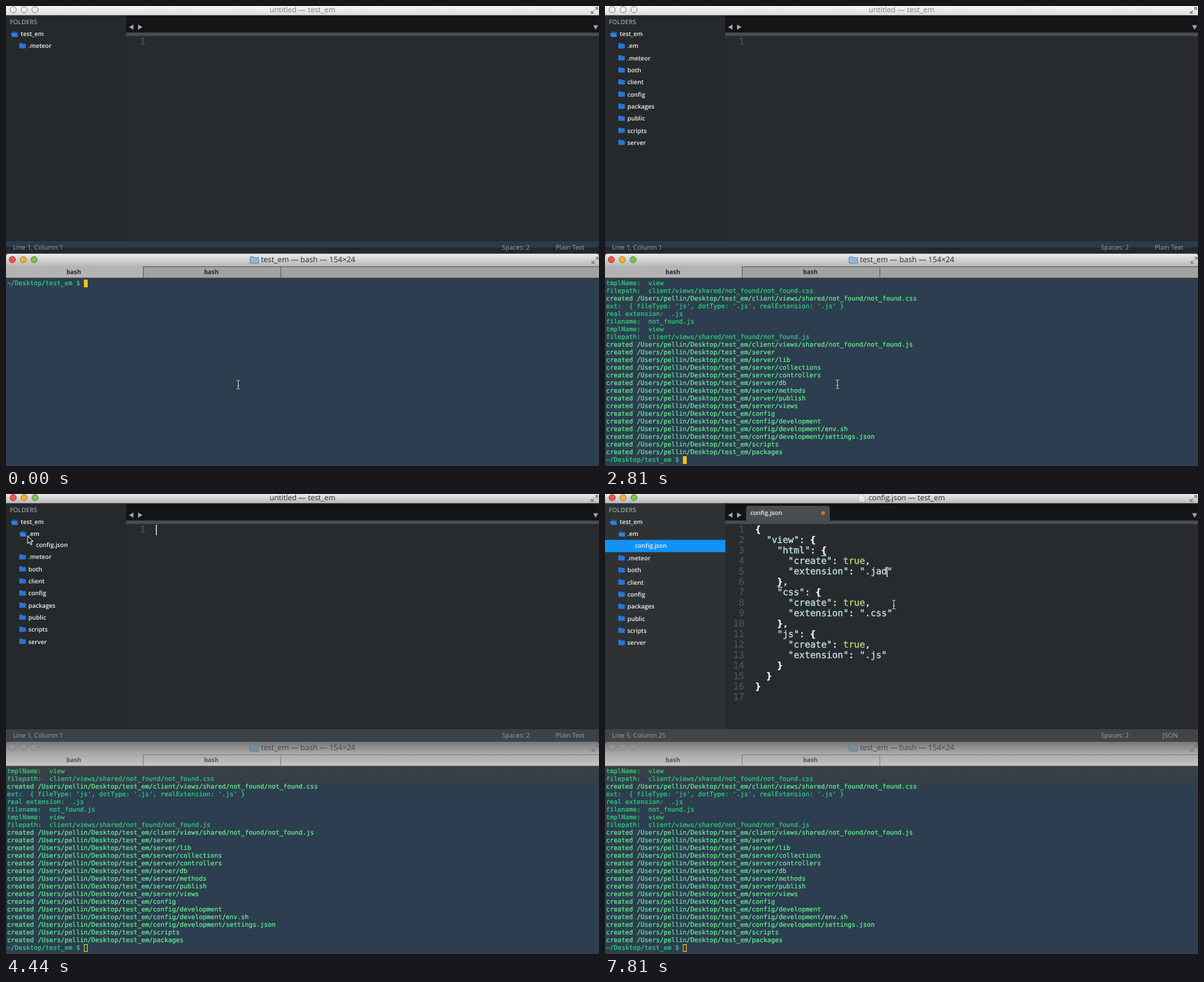
Write an HTML page that moves like this. It is 849 by 659 pixels and loops after 8000 ms.

```html
<!DOCTYPE html>
<html lang="en">
<head>
<meta charset="utf-8">
<title>Project scaffold</title>
<style>
html, body { margin: 0; width: 100%; height: 100%; overflow: hidden; background: #2c3e50; }
svg { display: block; width: 849px; height: 659px; }
text { white-space: pre; font-family: "Open Sans", "Noto Sans", sans-serif; text-rendering: geometricPrecision; }
.title { font-size: 10.7px; text-anchor: middle; }
.side { font-size: 8.7px; font-weight: 600; fill: #f2f4f5; }
.status { font-size: 9.25px; fill: #9da2a5; }
.tab { font-size: 8.9px; font-weight: 700; text-anchor: middle; fill: #262626; }
.code, .log { fill: currentColor; stroke: currentColor; stroke-width: .3px; }
.code { font: 13.05px "DejaVu Sans Mono", monospace; color: #f4f7f8; }
.num { color: #4b5356; text-anchor: end; }
.str { color: #c3e7ee; }
.kw { color: #b2dd7c; }
.br { color: #fff; font-weight: 700; }
.log { font: 9.136px "DejaVu Sans Mono", monospace; color: #31d478; stroke-width: .2px; }
.log.made { color: #66f48e; }
</style>
</head>
<body>
<svg viewBox="0 0 849 659" xmlns="http://www.w3.org/2000/svg">
  <defs>
    <linearGradient id="barOff" x2="0" y2="1"><stop stop-color="#f6f6f6"/><stop offset="1" stop-color="#dcdcdc"/></linearGradient>
    <linearGradient id="barOn" x2="0" y2="1"><stop stop-color="#ececec"/><stop offset="1" stop-color="#b6b6b6"/></linearGradient>
    <linearGradient id="barShade" x2="0" y2="1"><stop stop-color="#777"/><stop offset="1" stop-color="#adadad"/></linearGradient>
    <linearGradient id="tabShade" x2="0" y2="1"><stop stop-color="#a9a9a9"/><stop offset="1" stop-color="#c6c6c6"/></linearGradient>
    <linearGradient id="shadow" x2="0" y2="1"><stop stop-color="#3a4046"/><stop offset=".55" stop-color="#343f49"/><stop offset="1" stop-color="#2c3e50"/></linearGradient>
    <path id="closed" d="M0 1.2Q0 .4.8.4H3.4L4.4 1.4H8.6Q9.4 1.4 9.4 2.2V7.2Q9.4 8 8.6 8H.8Q0 8 0 7.2Z" fill="#2c73d2"/>
    <g id="open">
      <path d="M2 1.2Q2 .4 2.8.4H5.4L6.4 1.5H10.2V8H2Z" fill="#1f5cb0"/>
      <path d="M0 3H8.2L10 8.2H1.6Z" fill="#3580e0"/>
    </g>
    <path id="full" d="M5 1H9V5M9 1L5.5 4.5M0 6V9.5H4M0 9.5L3.6 6" fill="none" stroke="#777" stroke-width="1.1"/>
  </defs>

  <!-- editor window -->
  <rect width="849" height="354" fill="#272b2d"/>
  <rect id="edBar" width="849" height="13.5"/>
  <g id="edLights"></g>
  <g id="doc"><path d="M363.5 .5H369L372 3.5V11.5H363.5Z" fill="#fff" stroke="#8d8d8d" stroke-width=".8"/><path d="M369 .5V3.5H372" fill="none" stroke="#8d8d8d" stroke-width=".8"/></g>
  <text id="edTitle" class="title" y="9"/>
  <use href="#full" x="838" y="1"/>
  <rect id="sidebar" y="13.5" width="172" height="323.5"/>
  <rect x="172" y="13.5" width="677" height="24.5" fill="#121416"/>
  <rect x="172" y="38" width="677" height="5" fill="#4a4d50"/>
  <path d="M182.5 26.5V34L176 30.250ZM189 26.5V34L195.5 30.250ZM840.5 27.5H848L844.250 34Z" fill="#a0a3a5"/>
  <g id="tab">
    <path d="M202 39V20Q202 17 205 17H319Q322 17 322 20V39Z" fill="#4a4d50"/>
    <text class="side" x="208" y="30">config.json</text>
    <g id="cross"><rect x="308.5" y="23.5" width="7.5" height="7.5" rx="1.5" fill="#9b9ea0"/><path d="M310.5 25.5L314 29M314 25.5L310.5 29" stroke="#4a4d50"/></g>
    <circle id="dirty" cx="312.3" cy="27.2" r="2.6" fill="#d5762f"/>
  </g>
  <text x="5.5" y="26" class="side" style="font-size:9px;fill:#9ca0a2">FOLDERS</text>
  <rect id="picked" y="65.700" width="172.400" height="17.600" fill="#1492f5"/>
  <use href="#open" x="7" y="36"/>
  <text class="side" x="21" y="43.200">test_em</text>
  <g id="tree"></g>
  <rect id="sel" y="104" height="15" rx="2" fill="#4b555b"/>
  <g id="code"></g>
  <path id="marks" fill="none" stroke="#dfe5e8"/>
  <rect id="caret" width="1.2" height="15" fill="#f4f4f4"/>
  <rect y="337" width="849" height="17.5" id="statusBar"/>
  <path id="edge" d="M0 344Q5 346 12 346H837Q844 346 849 344V355H0Z" fill="#23282c"/>
  <text id="place" class="status" x="10" y="348.700"/>
  <text class="status" x="710" y="348.700">Spaces: 2</text>
  <text id="syntax" class="status" y="348.700"/>

  <!-- terminal window -->
  <rect y="354.5" width="849" height="305" fill="#2c3e50"/>
  <rect id="shade" y="390" width="849" height="34" fill="url(#shadow)"/>
  <rect y="354" width="849" height="3" fill="#3f4346"/>
  <path id="tmBar" d="M0 373V359Q0 355 4 355H845Q849 355 849 359V373Z"/>
  <rect id="tabs" y="373" width="849" height="16.5"/>
  <rect id="tabOne" y="373" width="196" height="16.5"/>
  <path id="tabLines" d="M196.5 373V389M393.5 373V389M196 373.5H849M0 389.5H849" fill="none"/>
  <g id="tmLights"></g>
  <g id="folder"><path d="M349.5 360V368.5H361.5V360.5H355L354 359H350.5Z" stroke="#5c7f9a" stroke-width=".8"/></g>
  <text id="tmTitle" class="title" x="432.500" y="367.200" style="font-size:10.9px"/>
  <use href="#full" x="839" y="359"/>
  <text id="tabName" class="tab" x="97" y="384.300"/>
  <text class="tab" x="294" y="384.300">bash</text>
  <g id="logs"></g>
  <rect id="block" width="5.5" height="11"/>

  <path id="arrow" d="M0 0V11L2.5 8.700L4.300 12.800L6.200 12L4.400 8H8Z" fill="#111" stroke="#fff"/>
  <g id="beam" fill="none">
    <path id="ibeam" d="M-2.5 -6.5Q0 -6.5 0 -4.5V4.5Q0 6.5 -2.5 6.5M2.5 -6.5Q0 -6.5 0 -4.5M0 4.5Q0 6.5 2.5 6.5M-1.5 1.5H1.5" stroke="#15191c" stroke-width="2.2" opacity=".65"/>
    <path d="M-2.5 -6.5Q0 -6.5 0 -4.5V4.5Q0 6.5 -2.5 6.5M2.5 -6.5Q0 -6.5 0 -4.5M0 4.5Q0 6.5 2.5 6.5M-1.5 1.5H1.5" stroke="#d5dadd"/>
  </g>
</svg>
<script>
const LOOP = 8000, CELL = 5.5, COL = 7.856, ROW = 17.3;
const $ = id => document.getElementById(id);
const set = (el, attrs) => { for (const k in attrs) el.setAttribute(k, attrs[k]); };
const show = (id, on) => { $(id).style.display = on ? '' : 'none'; };
const put = (el, s) => { if (el.textContent !== s) el.textContent = s; };
const within = (t, a, b) => t >= a && t < b;

function add(parent, tag, attrs) {
  const el = document.createElementNS('http://www.w3.org/2000/svg', tag);
  set(el, attrs);
  return $(parent).appendChild(el);
}

// last value whose start time has passed
const stepAt = (steps, t) => steps.reduce((v, [at, next]) => t >= at ? next : v, steps[0][1]);

// terminal log
const HOME = '/Users/pellin/Desktop/test_em';
const PROMPT = '~/Desktop/test_em $ ';
const made = paths => paths.map(p => `created ${HOME}/${p}`);
const config = ['configOpts { view:',
  "   { html: { create: true, extension: '.html' },",
  "     css: { create: true, extension: '.css' },",
  "     js: { create: true, extension: '.js' } } }"];

function template(name, ext) {
  const dir = `client/views/shared/${name}`, path = `${dir}/${name}.${ext}`;
  return [`ext:  { fileType: '${ext}', dotType: '.${ext}', realExtension: '.${ext}' }`,
    `real extension:  .${ext}`, `filename:  ${name}.${ext}`, 'tmplName:  view', `filepath:  ${path}`,
    ...made(ext === 'html' ? [dir, path] : [path])];
}
const view = name => ['html', 'css', 'js'].flatMap(ext => template(name, ext));
const under = (dir, names) => [dir, ...names.split(' ').map(n => `${dir}/${n}`)];

const start = made([...under('both', 'lib collections controllers'),
  ...under('client', 'lib collections controllers views views/shared')]);
const first = [...start, ...config, ...config, ...view('loading'), ...config, ...config];
const second = [...first, ...view('not_found')];
const all = [...second, ...made([
  ...under('server', 'lib collections controllers db methods publish views'),
  ...under('config', 'development development/env.sh development/settings.json'),
  'scripts', 'packages'])];

const COMMAND = 'em init';
const keyTimes = [360, 450, 770, 1040, 1160, 1340, 1570];
const output = [[0, []], [1970, start], [2040, first], [2100, second], [2160, all]];

function screen(t) {
  const typed = COMMAND.slice(0, keyTimes.filter(k => t >= k).length);
  const lines = [PROMPT + typed];
  if (t >= 1900) lines.push(...stepAt(output, t), t >= 2160 ? PROMPT : '');
  return lines.slice(-24);
}

const rows = Array.from({ length: 24 }, (_, i) =>
  add('logs', 'text', { x: 1.5, y: 400.4 + i * 11, class: 'log' }));

// sidebar
const folders = ['.em', '.meteor', 'both', 'client', 'config', 'packages', 'public', 'scripts', 'server'];
const items = folders.map(name => {
  const g = add('tree', 'g', {});
  g.innerHTML = `<use href="#closed" x="19" y="-4.5"/><text class="side" x="32" y="3.200">${name}</text>`;
  return g;
});
const child = add('tree', 'text', { class: 'side', x: 43 });

function drawTree(t) {
  const count = stepAt([[0, 1], [2370, 2], [2520, 4], [2550, 7], [2580, 9]], t);
  const p = Math.min(1, Math.max(0, (t - 4380) / 110));
  const grow = ROW * (1 - (1 - p) ** 3);
  items.forEach((g, i) => {
    const slot = count === 1 ? i - 1 : i;
    const y = 57.2 + slot * ROW + (i ? grow : 0);
    g.style.display = slot >= 0 && slot < count ? '' : 'none';
    set(g, { transform: `translate(0 ${y})` });
  });
  set(items[0].firstChild, { href: p > 0 ? '#open' : '#closed' });
  put(child, p > .3 ? 'config.json' : '');
  set(child, { y: 59.8 + grow });
}

// document
const part = (name, ext, last) => [`    "${name}": {`, '      "create": true,',
  `      "extension": ".${ext}"`, last ? '    }' : '    },'];
const source = word => ['{', '  "view": {', ...part('html', word), ...part('css', 'css'),
  ...part('js', 'js', true), '  }', '}', ''];
const paint = s => s.replace(/"[^"]*"|true|[{}]/g, m =>
  `<tspan class="${m[0] === '"' ? 'str' : m === 'true' ? 'kw' : 'br'}">${m}</tspan>`);
const X0 = 215.2;
const guides = add('code', 'path', { stroke: '#2f3437', 'stroke-dasharray': '1 1', fill: 'none',
  d: 'M216.5 59V269M231.5 74V254' + [89, 149, 209].map(y => `M247.5 ${y}v30`).join('') });
const codeRows = source('html').map((_, i) => {
  const y = 55 + i * 15;
  return [add('code', 'text', { class: 'code num', x: 199.3, y }), add('code', 'text', { class: 'code', x: X0, y })];
});
codeRows.forEach(([num], i) => { num.textContent = i + 1; });
let lastWord = null;

function drawCode(t, opened) {
  const word = stepAt([[0, 'html'], [7590, 'j'], [7700, 'ja'], [7810, 'jad']], t);
  const key = opened ? word : '';
  if (key !== lastWord) {
    source(word).forEach((s, i) => {
      codeRows[i][1].innerHTML = opened ? paint(s) : '';
      codeRows[i][0].style.display = opened || !i ? '' : 'none';
    });
    lastWord = key;
  }
  guides.style.display = opened ? '' : 'none';

  const selected = within(t, 6680, 7590), inner = t >= 6540;
  show('sel', selected);
  set($('sel'), { x: X0 + 21 * COL, width: 4 * COL });
  show('marks', opened && !selected);
  const mark = (col, line) => `M${X0 + col * COL} ${58.5 + line * 15}h7.5`;
  set($('marks'), { d: inner ? mark(12, 2) + mark(4, 5) : mark(0, 0) + mark(0, 15) });

  const col = !inner ? 0 : selected ? 25 : t < 6680 ? 22 : 21 + word.length;
  const blink = within(t, 4700, 5220) || within(t, 5720, 6210) || within(t, 7320, 7590);
  show('caret', t >= 4290 && !blink);
  set($('caret'), { x: X0 - .5 + col * COL, y: inner ? 104 : 44, opacity: within(t, 7230, 7320) ? .5 : 1 });

  put($('place'), selected ? '4 characters selected'
    : inner ? `Line 5, Column ${col + 1}` : 'Line 1, Column 1');
}

// window buttons
const colors = [['#f0574d', '#a52f28'], ['#f3b23c', '#a8771f'], ['#7cc254', '#4c8734']];
const lights = (parent, xs, y) => xs.map(cx => add(parent, 'circle', { cx, cy: y, r: 4.4 }));
const edLights = lights('edLights', [10.3, 26, 41.5], 5.2);
const tmLights = lights('tmLights', [9, 24.7, 40.2], 363.3);
const busy = add('tmLights', 'circle', { cx: 9, cy: 363.3, r: 1.6, fill: '#5a120e' });
const light = (list, on, off) => list.forEach((c, i) =>
  set(c, { fill: on ? colors[i][0] : off, stroke: on ? colors[i][1] : '#858585' }));

function drawChrome(t, focus, opened) {
  const node = within(t, 1900, 2160), dirty = t >= 7590;
  const job = node ? 'node' : 'bash';
  light(edLights, focus, '#ededed');
  light(tmLights, !focus, '#959595');
  busy.style.display = node ? '' : 'none';
  set($('edBar'), { fill: `url(#${focus ? 'barOn' : 'barOff'})` });
  put($('edTitle'), (opened ? 'config.json' : 'untitled') + ' — test_em');
  set($('edTitle'), { x: opened ? 432 : 424.5, fill: focus ? '#262626' : '#7c7c7c' });
  set($('sidebar'), { fill: opened ? '#2e3235' : '#25292b' });
  show('doc', opened);
  set($('doc'), { opacity: dirty ? .5 : 1 });
  show('tab', opened);
  show('picked', opened);
  show('cross', !dirty);
  show('dirty', dirty);
  set($('statusBar'), { fill: opened ? '#414548' : focus ? '#3b4349' : '#2b3b4e' });
  show('edge', !focus);
  put($('syntax'), opened ? 'JSON' : 'Plain Text');
  set($('syntax'), { x: opened ? 798.5 : 787 });

  show('shade', focus);
  set($('tmBar'), { fill: `url(#${focus ? 'barShade' : 'barOn'})` });
  set($('tabs'), { fill: focus ? 'url(#tabShade)' : '#a2a2a2' });
  set($('tabOne'), { fill: focus ? 'url(#tabShade)' : '#b3b3b3' });
  set($('tabLines'), { stroke: focus ? '#828282' : '#5c5c5c' });
  put($('tmTitle'), `test_em — ${job} — 154×24`);
  set($('tmTitle'), { fill: focus ? '#454545' : '#262626' });
  set($('folder'), { opacity: node ? .5 : 1, fill: focus ? '#788d9b' : '#8fb8d8' });
  put($('tabName'), job);
  document.querySelectorAll('.tab').forEach(el => { el.style.fill = focus ? '#555' : '#262626'; });
}

function drawLog(t, focus) {
  const lines = screen(t), last = lines.length - 1;
  rows.forEach((el, i) => {
    const s = lines[i] || '';
    put(el, s);
    el.classList.toggle('made', s.startsWith('created'));
  });
  show('block', !within(t, 3300, 4290));
  const inset = focus ? .5 : 0;
  set($('block'), {
    x: 1.5 + lines[last].length * CELL + inset, y: 392 + last * 11 + inset,
    width: CELL - 2 * inset, height: 11 - 2 * inset,
    fill: focus ? 'none' : '#f1c40f', stroke: focus ? '#f1c40f' : 'none'
  });
}

// pointer: time, x, y
const path = [[0, 332.5, 542.5], [2810, 332.5, 542.5], [2980, 384, 440], [3110, 340, 335],
  [3390, 190, 123], [3690, 190, 123], [4260, 31, 60], [4580, 31, 60], [4740, 32, 70],
  [5430, 32, 70], [5560, 123, 83], [5800, 270, 100], [6220, 386, 110], [6280, 388, 111],
  [6720, 388, 111], [7000, 413.5, 158.5], [LOOP, 413.5, 158.5]];

function drawPointer(t, focus) {
  const i = path.findIndex(p => p[0] > t);
  const [a, x0, y0] = path[i - 1], [b, x1, y1] = path[i];
  const k = (t - a) / (b - a), x = x0 + (x1 - x0) * k, y = y0 + (y1 - y0) * k;
  const arrow = y < 390 && (!focus || x < 172);
  show('arrow', arrow);
  show('beam', !arrow);
  set($(arrow ? 'arrow' : 'beam'), { transform: `translate(${x} ${y})` });
}

function draw(t) {
  const focus = t >= 4290, opened = t >= 5220;
  drawChrome(t, focus, opened);
  drawTree(t);
  drawCode(t, opened);
  drawLog(t, focus);
  drawPointer(t, focus);
}

const began = performance.now();
function frame() {
  draw((performance.now() - began) % LOOP);
  requestAnimationFrame(frame);
}
frame();
</script>
</body>
</html>
```
